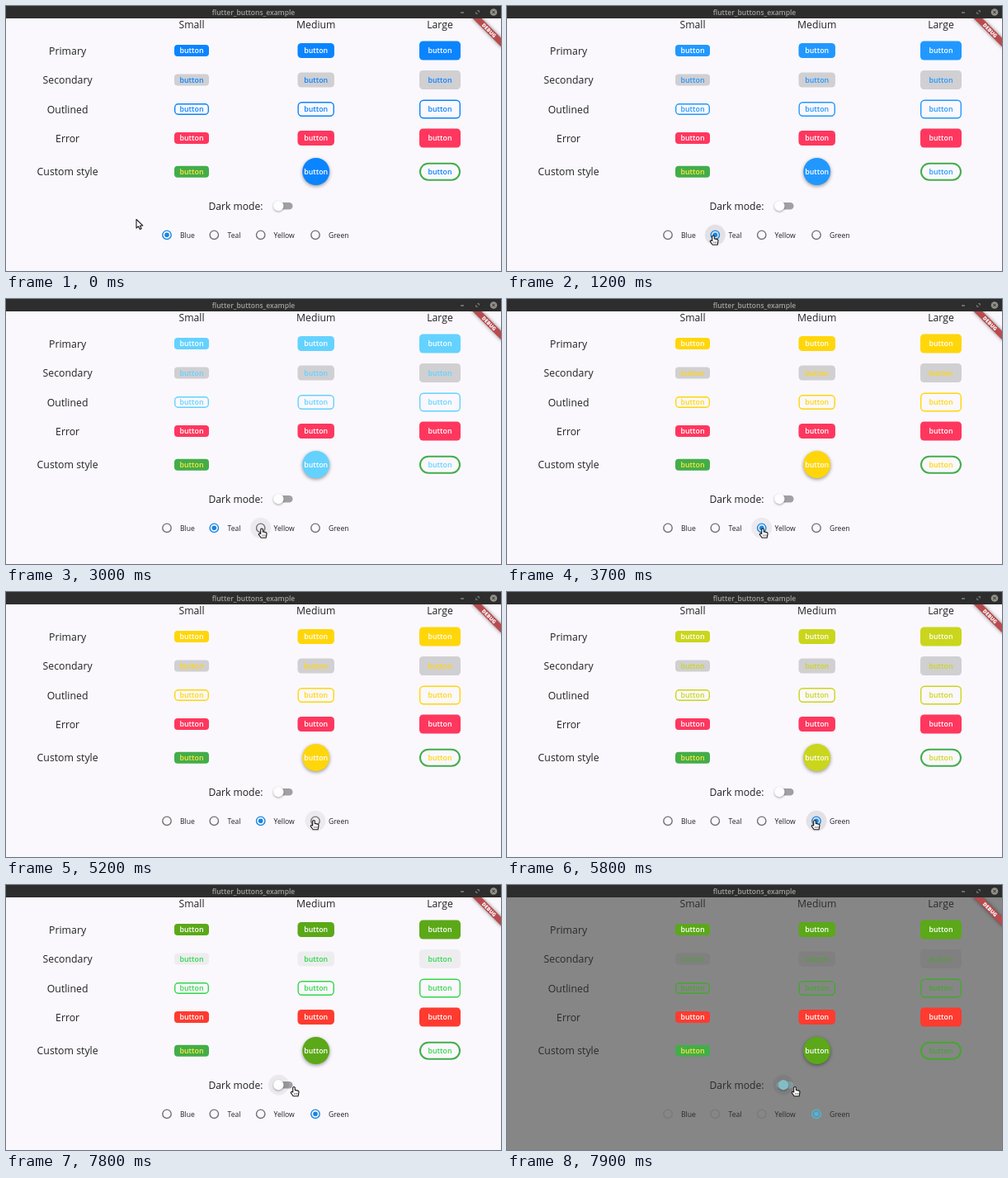
Write an HTML page with a canvas that moves like this. It is 600x321 px and loops after 8 s.

```html
<!DOCTYPE html>
<html lang="en">
<head>
<meta charset="utf-8">
<title>flutter_buttons_example</title>
<style>
  html, body { margin: 0; width: 100%; height: 100%; overflow: hidden; background: #faf8fc; }
  canvas { display: block; width: 600px; height: 321px; }
</style>
</head>
<body>
<canvas id="stage"></canvas>
<script>
const W = 600, H = 321, LOOP = 8000, STEP = 100;
const canvas = document.getElementById('stage');
const ctx = canvas.getContext('2d');
const dpr = window.devicePixelRatio || 1;
canvas.width = W * dpr;
canvas.height = H * dpr;

const FONT = '"Open Sans", "Noto Sans", sans-serif';
const GREEN = '#43ad4b';
const COLS = [225, 375.7, 526];
const SIZES = [[42, 14, 4], [44.5, 18, 4.5], [50, 23, 4.5]];
const ROWS = [['Primary', 54], ['Secondary', 89.5], ['Outlined', 125], ['Error', 160], ['Custom style', 200.7]];
const RADIOS = [['Blue', 195, 211], ['Teal', 252.3, 268.5], ['Yellow', 308.7, 324.5], ['Green', 375, 391]];
const RADIO_Y = 277.3;
const ACCENTS = [[10, 132, 255], [100, 210, 255], [255, 214, 10], [50, 215, 75]];
const PICKS = [0, 1200, 3300, 5800];   // when each radio becomes selected
const PRESS = 7800, DARKEN = 7900;

// start, end, target x, target y, sag of the path
const MOVES = [
  [100, 900, 250, 277.5, 3],
  [2200, 2700, 310, 277.5, 7],
  [4300, 5100, 373, 276, 11],
  [6500, 7200, 349, 244, 0]
];

const clamp = v => Math.max(0, Math.min(1, v));
const smooth = p => p * p * (3 - 2 * p);
const mix = (a, b, p) => a + (b - a) * p;
const rgb = c => `rgb(${c.map(Math.round).join(',')})`;

function text(str, x, y, size, color, weight = 400, align = 'center') {
  ctx.font = `${weight} ${size}px ${FONT}`;
  ctx.textAlign = align;
  ctx.fillStyle = color;
  ctx.fillText(str, x, y);
}

function circle(x, y, r, fill, stroke, width) {
  ctx.beginPath();
  ctx.arc(x, y, r, 0, Math.PI * 2);
  paint(fill, stroke, width);
}

function box(x, y, w, h, r, fill, stroke, width) {
  const inset = stroke ? width / 2 : 0;
  ctx.beginPath();
  ctx.roundRect(x - w / 2 + inset, y - h / 2 + inset, w - inset * 2, h - inset * 2, r);
  paint(fill, stroke, width);
}

function shape(points, fill, stroke, width) {
  ctx.beginPath();
  points.forEach(([x, y]) => ctx.lineTo(x, y));
  ctx.closePath();
  paint(fill, stroke, width);
}

function paint(fill, stroke, width) {
  if (fill) { ctx.fillStyle = fill; ctx.fill(); }
  if (stroke) { ctx.strokeStyle = stroke; ctx.lineWidth = width; ctx.stroke(); }
}

function shadowed(dy, blur, alpha, draw) {
  ctx.save();
  ctx.shadowColor = `rgba(0,0,0,${alpha})`;
  ctx.shadowBlur = blur * dpr;
  ctx.shadowOffsetY = dy * dpr;
  draw();
  ctx.restore();
}

function selectedAt(t) {
  return PICKS.filter(start => t >= start).length - 1;
}

function accentAt(t) {
  const i = selectedAt(t);
  if (i === 0) return ACCENTS[0];
  const p = smooth(clamp((t - PICKS[i] + STEP) / 300));
  return ACCENTS[i].map((v, k) => mix(ACCENTS[i - 1][k], v, p));
}

function cursorAt(t) {
  let x = 158, y = 258.5;
  for (const [start, end, tx, ty, sag] of MOVES) {
    const raw = clamp((t - start) / (end - start));
    const p = smooth(raw);
    x = mix(x, tx, p);
    y = mix(y, ty, p) + sag * Math.sin(Math.PI * raw);
  }
  return [x, y];
}

function palette(t) {
  const accent = rgb(accentAt(t));
  const pressed = t >= PRESS, dark = t >= DARKEN;
  return {
    dark,
    page: dark ? '#868687' : '#faf8fc',
    ink: dark ? '#2b2b2c' : '#222224',
    primary: pressed ? '#5ba818' : accent,
    line: dark ? '#45a72d' : accent,
    soft: dark ? '#5a993f' : accent,
    grey: dark ? '#808081' : pressed ? '#ededef' : '#d0cfd2',
    error: pressed ? '#ff3b30' : '#ff375f',
    radio: dark ? '#7a7a7b' : '#707072',
    active: dark ? '#45b9de' : '#1786e2'
  };
}

function drawButtons(c) {
  COLS.forEach((x, i) => {
    const [w, h, r] = SIZES[i];
    const caption = (row, color) => text('button', x, ROWS[row][1] + 3, 8.8, color, 600);
    box(x, ROWS[0][1], w, h, r, c.primary);
    caption(0, '#fff');
    box(x, ROWS[1][1], w, h, r, c.grey);
    caption(1, c.soft);
    box(x, ROWS[2][1], w, h, r, null, c.line, 1.4);
    caption(2, c.line);
    box(x, ROWS[3][1], w, h, r, c.error);
    caption(3, '#fff');
  });
  const y = ROWS[4][1];
  box(COLS[0], y, 42, 14, 4, GREEN);
  text('button', COLS[0], y + 3, 8.8, '#ffe838', 600);
  shadowed(1.5, 4, 0.4, () => circle(COLS[1], y - 0.2, 16.5, c.primary));
  text('button', COLS[1], y + 3, 8.8, '#fff', 600);
  box(COLS[2], y, 50, 22, 10, null, c.dark ? c.line : GREEN, 2);
  text('button', COLS[2], y + 3, 8.8, c.line, 600);
}

function drawSwitch(t, c) {
  const y = 242.2;
  text('Dark mode:', 278.5, 247, 12.1, c.ink);
  box(337, y, 21, 8.6, 4.3, c.dark ? '#89a5a7' : '#a09fa1');
  if (t >= 7200) circle(c.dark ? 335 : 330.5, y, 12.5, 'rgba(0,0,0,0.06)');
  shadowed(1, 2.5, 0.35, () => circle(c.dark ? 335 : 330.3, y, 6.2, c.dark ? '#83bcc4' : '#fdfcfe'));
}

function drawRadios(t, c, [cx, cy]) {
  const selected = selectedAt(t);
  RADIOS.forEach(([label, x, labelX], i) => {
    const on = i === selected;
    const hover = Math.hypot(cx - x, cy - RADIO_Y) < 12.5;
    if (hover) {
      const press = i > 0 && t >= PICKS[i] - STEP && t < PICKS[i] + 200;
      circle(x, RADIO_Y, 12.5, `rgba(0,0,0,${press ? 0.09 : 0.055})`);
    }
    circle(x, RADIO_Y, 5.2, null, on ? c.active : c.radio, 1.4);
    if (on) circle(x, RADIO_Y, 2.8, c.active);
    text(label, labelX, RADIO_Y + 3.2, 8.6, c.ink, 400, 'left');
  });
}

function drawBanner() {
  ctx.save();
  ctx.beginPath();
  ctx.rect(0, 15, W, H);
  ctx.clip();
  ctx.translate(600, 15);
  ctx.rotate(Math.PI / 4);
  shadowed(0, 4, 0.5, () => {
    ctx.fillStyle = '#b94b4e';
    ctx.fillRect(-26, 16.8, 52, 7.4);
  });
  text('DEBUG', 0, 22.8, 6.2, '#fff', 800);
  ctx.restore();
}

function drawTitleBar() {
  ctx.fillStyle = '#2d2d2d';
  ctx.fillRect(0, 0, W, 15);
  text('flutter_buttons_example', 300, 11, 8.5, '#a3a39f', 600);
  ctx.fillStyle = '#a8a8a4';
  ctx.fillRect(551, 7.5, 4, 1);
  ctx.strokeStyle = '#96968f';
  ctx.lineWidth = 0.9;
  ctx.beginPath();
  for (const s of [-1, 1]) {
    const x = 571.5 + s * 1.8, y = 7.5 - s * 1.8;
    ctx.moveTo(x - s * 2, y);
    ctx.lineTo(x, y);
    ctx.lineTo(x, y + s * 2);
  }
  ctx.stroke();
  circle(591, 7.5, 4.3, '#92928a');
  ctx.beginPath();
  for (const s of [-1, 1]) {
    ctx.moveTo(589.3, 7.5 - s * 1.7);
    ctx.lineTo(592.7, 7.5 + s * 1.7);
  }
  paint(null, '#2d2d2d', 1);
}

function drawArrow() {
  shape([[0, 0], [0, 10.5], [2.5, 8.3], [4.3, 12], [6.1, 11.2], [4.5, 7.7], [7.8, 7.4]], '#fff', '#1c1c1c', 1.1);
}

function drawHand() {
  ctx.beginPath();
  ctx.moveTo(-1.3, 7);
  ctx.lineTo(-1.3, 1.4);
  ctx.quadraticCurveTo(0, -0.4, 1.3, 1.4);
  ctx.lineTo(1.3, 4.4);
  ctx.lineTo(4.8, 5.1);
  ctx.quadraticCurveTo(6, 5.4, 6, 6.8);
  ctx.lineTo(5.1, 11.8);
  ctx.lineTo(-0.8, 11.8);
  ctx.lineTo(-3.8, 7.6);
  ctx.quadraticCurveTo(-3.4, 5.6, -1.3, 7);
  ctx.closePath();
  paint('#fff', '#1c1c1c', 1.1);
  ctx.beginPath();
  for (const x of [0.6, 2.3, 4]) {
    ctx.moveTo(x, 8);
    ctx.lineTo(x, 10);
  }
  paint(null, '#333', 0.6);
}

function drawCursor(t, [x, y]) {
  const overRadio = RADIOS.some(([, rx]) => Math.hypot(x - rx, y - RADIO_Y) < 12.5);
  ctx.save();
  ctx.translate(x, y);
  ctx.lineJoin = 'round';
  if (overRadio || t >= 7400) drawHand(); else drawArrow();
  ctx.restore();
}

function draw(t) {
  const c = palette(t), cursor = cursorAt(t);
  ctx.setTransform(dpr, 0, 0, dpr, 0, 0);
  ctx.fillStyle = c.page;
  ctx.fillRect(0, 0, W, H);
  ['Small', 'Medium', 'Large'].forEach((s, i) => text(s, COLS[i], 27, 12.2, c.ink));
  ROWS.forEach(([label, y]) => text(label, 74.6, y + 4.6, 12.3, c.ink));
  drawButtons(c);
  drawSwitch(t, c);
  drawRadios(t, c, cursor);
  drawBanner();
  drawTitleBar();
  drawCursor(t, cursor);
}

const began = performance.now();
function tick() {
  const t = (performance.now() - began) % LOOP;
  draw(Math.floor(t / STEP) * STEP);
  requestAnimationFrame(tick);
}
tick();
</script>
</body>
</html>
```
